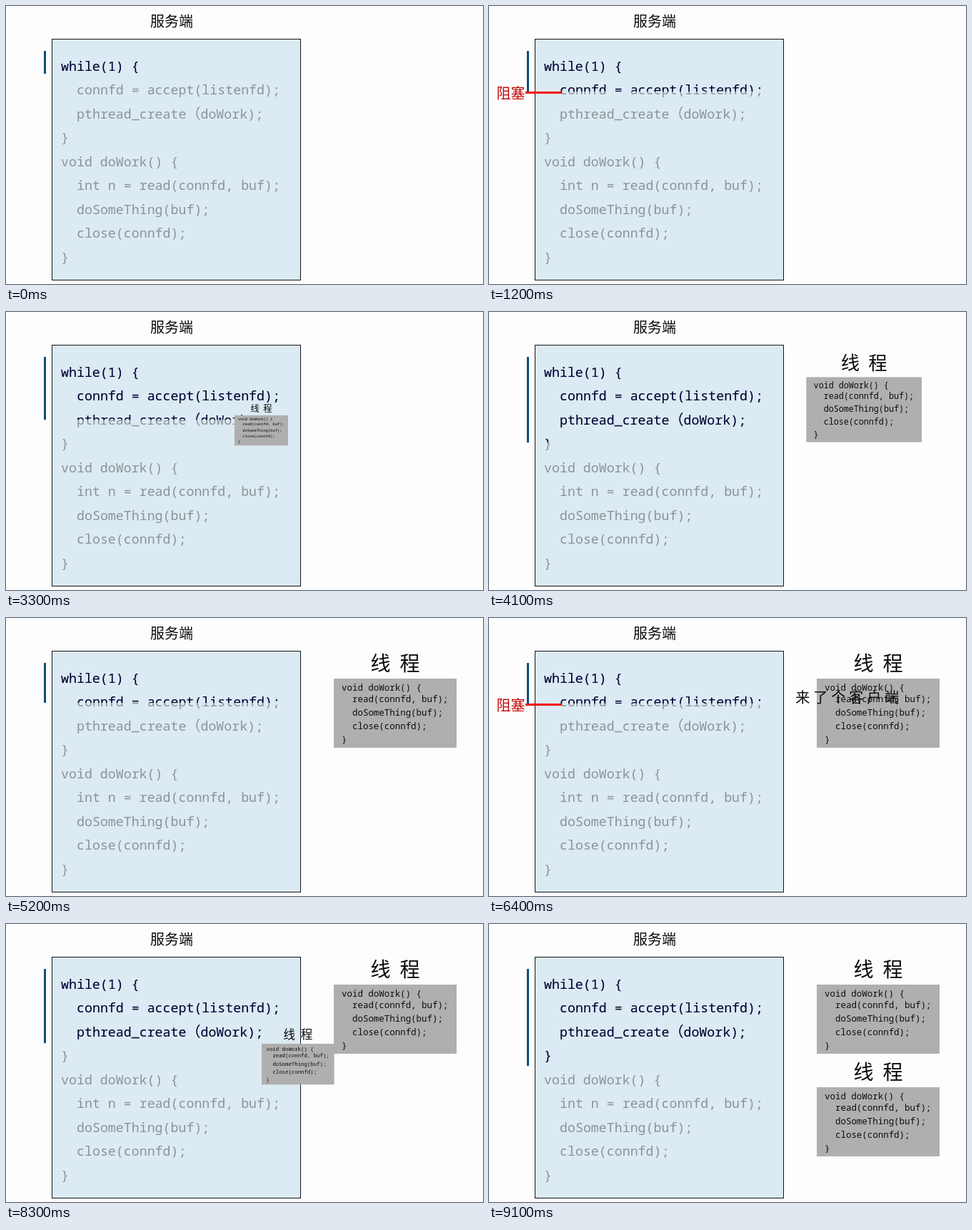
An HTML page for the animation above (9200 ms loop, 668 by 390 pixels).

```html
<!DOCTYPE html>
<html lang="zh-CN">
<head>
<meta charset="utf-8">
<style>
html, body { margin: 0; width: 100%; height: 100%; overflow: hidden; background: #fdfdfd; }
svg { display: block; }
text { font-family: "Noto Sans CJK SC", "Noto Sans CJK", sans-serif; font-size: 20px; fill: #0a0a0a; }
.code text { font-family: "Noto Sans Mono", "DejaVu Sans Mono", monospace; font-size: 18.27px; }
.wide { font-family: "Noto Sans CJK SC", "Noto Sans CJK", sans-serif; font-size: 20px; }
.dim text { fill: #8d9296; }
.lit text { fill: #04043a; }
.panel .code text { font-size: 12.45px; fill: #0c0c0c; }
.panel .head { font-size: 28px; letter-spacing: 13px; }
#client { letter-spacing: 5px; }
#title, #client, #block text { font-weight: 500; }
#block text { fill: #c40808; }
</style>
</head>
<body>
<svg width="668" height="390" viewBox="0 0 668 390">
  <defs><clipPath id="wipe"><rect id="edge" width="668" height="95"/></clipPath></defs>
  <text id="title" x="202" y="29">服务端</text>
  <rect x="64.5" y="46.5" width="348" height="338" fill="#dbeaf3" stroke="#10141c"/>
  <g id="dim" class="code dim"></g>
  <g id="lit" class="code lit" clip-path="url(#wipe)"></g>
  <rect id="bar" x="53" y="63" width="3" height="32" fill="#0b4f80"/>
  <g id="block">
    <text x="10.5" y="129.6">阻塞</text>
    <rect x="51" y="120" width="51" height="3" fill="#f20606"/>
  </g>
  <g id="panels"></g>
  <text id="client">来了个客户端</text>
</svg>
<script>
const LOOP = 9200, CYCLE = 4600, STEP = 100;
const $ = id => document.getElementById(id);

// Each line: [indent level, text]
const server = [
  [0, 'while(1) {'],
  [1, 'connfd = accept(listenfd);'],
  [1, 'pthread_create<tspan class="wide">（</tspan>doWork);'],
  [0, '}'],
  [0, 'void doWork() {'],
  [1, 'int n = read(connfd, buf);'],
  [1, 'doSomeThing(buf);'],
  [1, 'close(connfd);'],
  [0, '}']
];
const worker = [
  [0, 'void doWork() {'],
  [1, 'read(connfd, buf);'],
  [1, 'doSomeThing(buf);'],
  [1, 'close(connfd);'],
  [0, '}']
];

const listing = (lines, x, indent, baseline) => lines.map(([level, s], i) =>
  `<text x="${x + level * indent}" y="${baseline(i)}">${s}</text>`).join('');

$('dim').innerHTML = $('lit').innerHTML = listing(server, 77, 22, i => 91 + 33.45 * i);

const panelBody = `<rect width="172" height="97" fill="#afafaf"/>
  <text class="head" x="51.5" y="-11.4">线程</text>
  <g class="code">${listing(worker, 11, 15, i => i ? 14 + 19 * i : 17)}</g>`;
$('panels').innerHTML = `<g class="panel">${panelBody}</g>`.repeat(2);
const panels = [...document.querySelectorAll('.panel')];

const mix = (a, b, k) => a + (b - a) * k;
const show = (el, on) => el.setAttribute('visibility', on ? 'visible' : 'hidden');

// One second of motion, speeding up evenly, then slowing down evenly
function glide(t, start) {
  const u = Math.min(1, Math.max(0, (t - start) / 1000));
  return u < 0.5 ? 2 * u * u : 1 - 2 * (1 - u) ** 2;
}

// Bar runs at 40 px/s and waits on accept()
function barEnd(t) {
  return t < 2520 ? Math.min(120, 95 + t * 0.04) : 120 + (t - 2520) * 0.04;
}

function placePanel(el, t, endY) {
  show(el, t >= 3300);
  const k = glide(t, 3330);
  el.setAttribute('transform',
    `translate(${mix(320, 459, k)} ${mix(145, endY, k)}) scale(${mix(0.436, 1, k)})`);
}

function draw(time) {
  const t = time % CYCLE;
  const end = barEnd(t);
  $('edge').setAttribute('height', end);
  $('bar').setAttribute('height', end - 63);

  show($('block'), t >= 700 && t < 2500);

  const client = $('client');
  const k = glide(t, 1500);
  show(client, t >= 1500 && t < 2500);
  client.setAttribute('x', mix(446, 352.4, k));
  client.setAttribute('y', mix(117.6, 125.6, k));

  placePanel(panels[0], time, 85);
  placePanel(panels[1], time - CYCLE, 229);
}

const start = performance.now();
function tick() {
  const now = Math.max(0, performance.now() - start);
  draw(Math.floor(now % LOOP / STEP) * STEP);
  requestAnimationFrame(tick);
}
tick();
</script>
</body>
</html>
```
